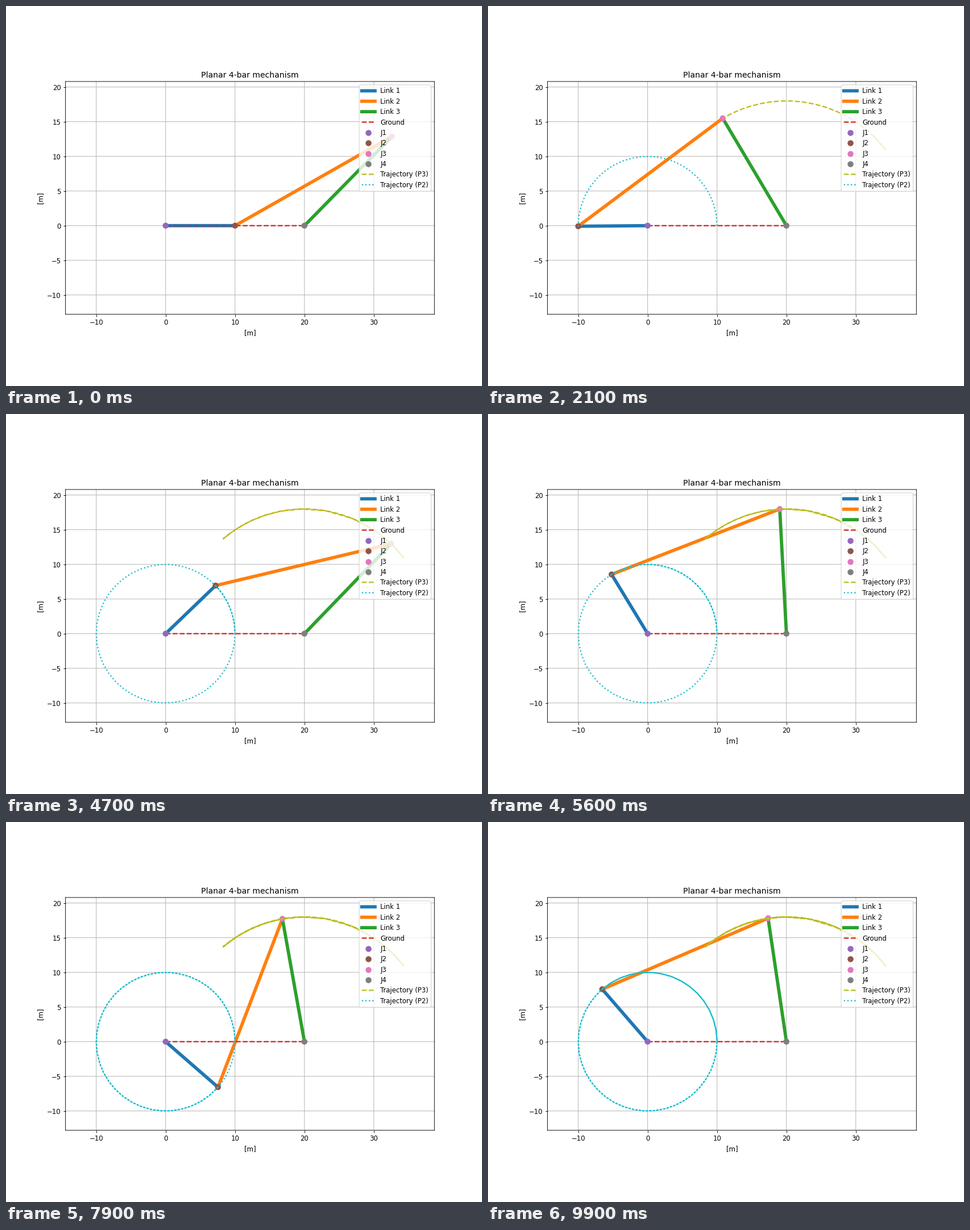
A matplotlib script that plays this animation: 837x669 px, repeating every 10 s.

```python
import numpy as np
import matplotlib.pyplot as plt
from matplotlib.animation import FuncAnimation
from matplotlib.patches import Circle

CRANK, COUPLER, ROCKER, GROUND = 10, 26, 18, 20
FRAMES = 100
STEP = 0.15  # crank angle per frame, rad
JOINT_RADIUS = 0.43


def solve(theta):
    """Return the crank pin and the rocker pin for each crank angle."""
    p2 = CRANK * np.column_stack([np.cos(theta), np.sin(theta)])
    dx, dy = p2[:, 0] - GROUND, p2[:, 1]
    d = np.hypot(dx, dy)
    inner = np.arccos((d**2 + ROCKER**2 - COUPLER**2) / (2 * d * ROCKER))
    phi = np.arctan2(dy, dx) - inner
    p3 = ROCKER * np.column_stack([np.cos(phi), np.sin(phi)])
    return p2, p3 + [GROUND, 0]


def limits(values, margin=0.1):
    low, high = values.min(), values.max()
    pad = margin * (high - low)
    return low - pad, high + pad


P1 = np.array([0.0, 0.0])
P4 = np.array([float(GROUND), 0.0])
P2, P3 = solve(STEP * np.arange(FRAMES))
reach = np.vstack([P2, P3])

plt.rcParams["path.snap"] = False
fig, ax = plt.subplots(figsize=(10, 7.993), dpi=83.7)
ax.set_aspect("equal")
ax.set_xlim(*limits(reach[:, 0]))
ax.set_ylim(*limits(reach[:, 1]))
ax.set_title("Planar 4-bar mechanism")
ax.set_xlabel("[m]")
ax.set_ylabel("[m]")
ax.grid(True)


def add_line(label, style="-", width=2):
    return ax.plot([], [], style, lw=width, label=label)[0]


def add_joint(label):
    """Add a legend dot and a disc that moves without pixel rounding."""
    key = ax.plot([], [], "o", ms=8, label=label)[0]
    disc = Circle((0, 0), JOINT_RADIUS, color=key.get_color(), lw=0, zorder=2)
    return ax.add_patch(disc)


links = [add_line(f"Link {k}", width=5) for k in (1, 2, 3)]
ground = add_line("Ground", "--")
joints = [add_joint(f"J{k}") for k in (1, 2, 3, 4)]
path3 = add_line("Trajectory (P3)", "--")
path2 = add_line("Trajectory (P2)", ":")
ground.set_data([P1[0], P4[0]], [P1[1], P4[1]])
ax.legend(loc="upper right", labelspacing=0.462)


def update(i):
    pins = np.array([P1, P2[i], P3[i], P4])
    for k, link in enumerate(links):
        link.set_data(*pins[k:k + 2].T)
    for joint, pin in zip(joints, pins):
        joint.set_center(pin)
    path3.set_data(*P3[:i + 1].T)
    path2.set_data(*P2[:i + 1].T)
    return [*links, *joints, path3, path2]


anim = FuncAnimation(fig, update, frames=FRAMES, interval=100, repeat=True)
plt.show()
```
